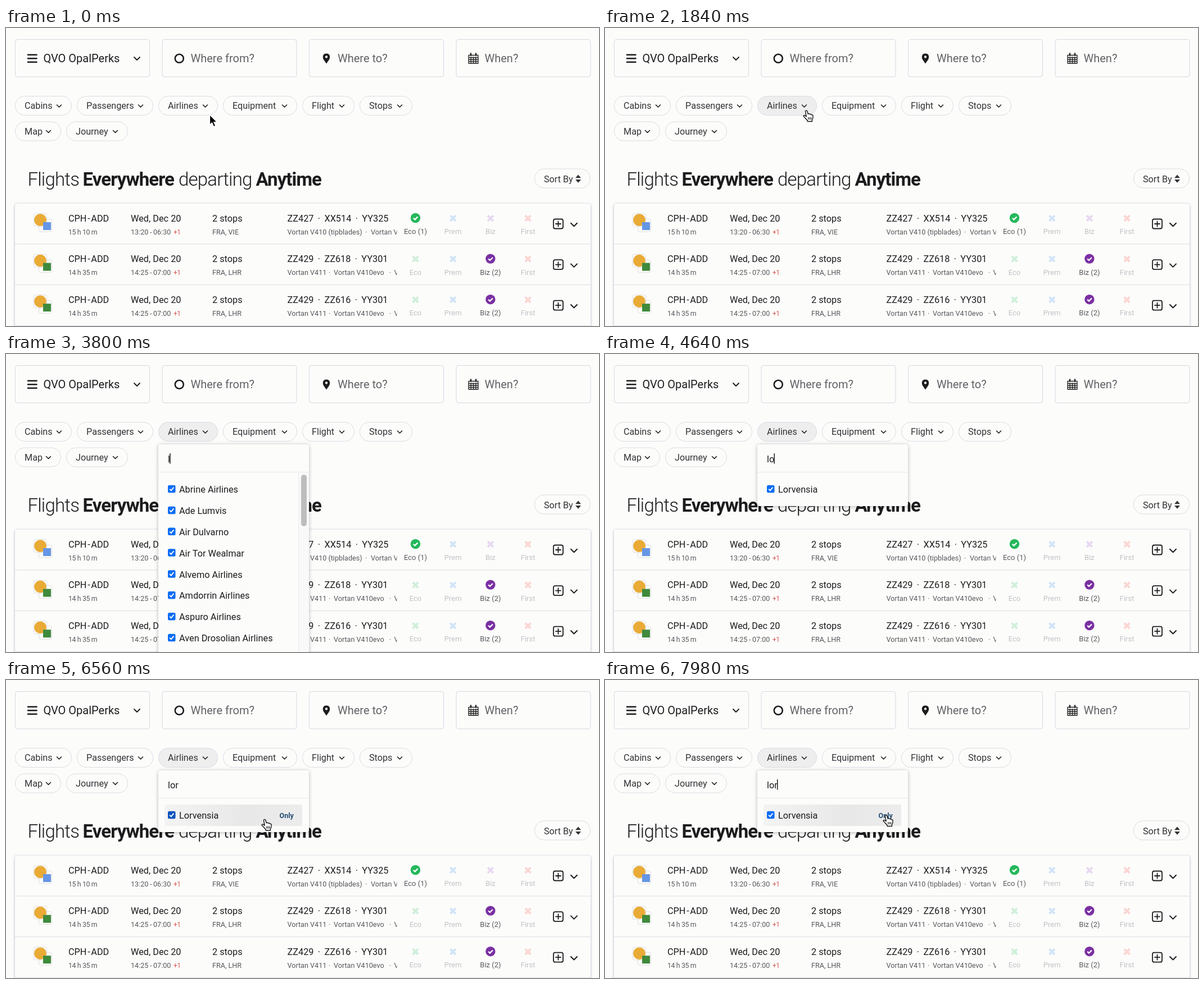
An HTML page for the animation above (8 s loop, 1055 px wide and 531 px high).

```html
<!DOCTYPE html>
<html lang="en">
<head>
<meta charset="utf-8">
<style>
  html, body { margin: 0; height: 100%; overflow: hidden; background: #fcfcfb; }
  svg { display: block; width: 1055px; height: 531px; overflow: hidden; }
  text { font-family: Roboto, "Open Sans", sans-serif; font-size: 16.3px; fill: #1c1c1e; white-space: pre; }
  .field { font-size: 20px; fill: #626266; }
  .program { font-size: 20px; }
  .pill { font-size: 16.2px; fill: #333336; }
  .title { font-size: 33px; font-weight: 300; letter-spacing: -.8px; }
  .bold { font-weight: 600; letter-spacing: -.9px; }
  .small { font-size: 12.6px; fill: #58585c; }
  .tight { font-size: 12.3px; letter-spacing: -.35px; }
  .plus { fill: #d9534f; font-size: 12px; letter-spacing: -.5px; }
  .cabin { font-size: 13px; text-anchor: middle; fill: #c2c2c6; }
  .on { fill: #5a5a5e; }
  .hint { fill: #757578; }
  .only { font-size: 12.5px; font-weight: 600; fill: #234c74; }
  .line { fill: none; stroke: #1c1c1e; stroke-width: 1.8; stroke-linecap: round; stroke-linejoin: round; }
  .card { filter: drop-shadow(0 1px 2px rgba(50, 45, 110, .38)); }
  .panel { filter: drop-shadow(0 1px 3px rgba(0, 0, 0, .28)); }
</style>
</head>
<body>
<svg viewBox="0 0 1055 531">
  <defs>
    <linearGradient id="hover"><stop stop-color="#f3f3f3"/><stop offset=".6" stop-color="#e8e8e8"/><stop offset="1" stop-color="#ececec"/></linearGradient>
    <clipPath id="planes"><path d="M490 300h205.5v240h-205.5z"/></clipPath>
  </defs>
  <g id="page"></g>
  <g id="menu"></g>
  <g id="cursor"></g>
</svg>
<script>
const LOOP = 8000;
const PAPER = '#fcfcfb';
const BORDER = 'stroke="#dcdce4"';
const $ = id => document.getElementById(id);

const text = (x, y, s, cls = '') => `<text x="${x}" y="${y}" class="${cls}">${s}</text>`;
const rect = (x, y, w, h, r, fill, extra = '') =>
  `<rect x="${x}" y="${y}" width="${w}" height="${h}" rx="${r}" fill="${fill}" ${extra}/>`;
const path = (d, attrs) => `<path d="${d}" ${attrs}/>`;
const line = (d, width = 1.8) => path(d, `class="line" style="stroke-width:${width}"`);
const circle = (x, y, r, fill) => `<circle cx="${x}" cy="${y}" r="${r}" fill="${fill}"/>`;
const chevron = (x, y, w = 4, width = 1.6) => line(`M${x - w} ${y - w / 2}l${w} ${w}l${w} ${-w}`, width);

function pill(x, y, w, label, id = '') {
  return rect(x + .5, y + .5, w - 1, 34, 17, PAPER, `${BORDER} id="${id}"`) +
    text(x + 17, y + 23.3, label, 'pill') + chevron(x + w - 22.5, y + 18);
}

function searchFields() {
  const labels = ['', 'Where from?', 'Where to?', 'When?'];
  const boxes = labels.map((label, i) => {
    const x = 16.5 + i * 261.5;
    return rect(x, 20.5, 239, 66.5, 4, PAPER, 'stroke="#d7d7e2"') + text(x + 50.5, 61.3, label, 'field');
  }).join('');
  const pin = 'M570 45.500c-7.500 0-7.500 8-3.800 12.500L570 63.500L573.800 58c3.700-4.500 3.700-12.500-3.800-12.500zm0 3.800a2.200 2.200 0 1 1-.01 0z';
  const calendar = 'M823 48.500h17v14.500h-17zM823 52.500h17M823 56h17M823 59.500h17M827.200 52v11M831.500 52v11M835.800 52v11';
  return boxes +
    line('M39 47.800h15.500M39 54.300h15.500M39 60.800h15.500', 2.6) +
    text(66.5, 61.3, 'QVO OpalPerks', 'program') + chevron(233, 54.5, 5, 1.8) +
    '<circle cx="308.300" cy="54.300" r="7.500" class="line" style="stroke-width:2.600"/>' +
    path(pin, 'fill="#1c1c1e"') + line(calendar, 1.3) + line('M827 45.500v3M836 45.500v3', 2.4);
}

const crossColors = ['#d0efda', '#d2e4f7', '#e8d8f1', '#fbd6d3'];

function cabin(i, y, name, seats) {
  const x = 728.5 + i * 66.7;
  const icon = seats
    ? circle(x, y, 8.7, i ? '#7a30a2' : '#25b85c') +
      path(`M${x - 3.7} ${y + .2}l2.700 2.700l5-5`, 'fill="none" stroke="#fff" stroke-width="2.200"')
    : path(`M${x - 4.8} ${y - 4.3}l9.600 9.600m0-9.600l-9.600 9.600`, `fill="none" stroke="${crossColors[i]}" stroke-width="4"`);
  return icon + text(x, y + 28.5, seats ? `${name} (${seats})` : name, seats ? 'cabin on' : 'cabin');
}

function flight(i, f) {
  const y = 338.5 + i * 72.6;
  const tile = (x, top) => rect(x, top, 23, 23, 3, PAPER, 'stroke="#dedede"');
  const cabins = ['Eco', 'Prem', 'Biz', 'First'].map((name, c) => cabin(c, y, name, c == f.cabin ? f.seats : 0));
  return tile(58.5, y + 1.5) + tile(49.5, y - 8) + circle(61, y + 3.5, 10.8, '#e9ab35') +
    rect(66, y + 7.5, 14, 14, 0, f.mark) +
    text(111, y + 6.3, 'CPH\u200a-\u200aADD') + text(111, y + 29, f.length, 'small tight') +
    text(222, y + 6.3, 'Wed, Dec 20') + text(222, y + 29, f.times, 'small') + text(298, y + 29, '+1', 'plus') +
    text(367, y + 6.3, '2 stops') + text(367, y + 29, f.via, 'small') +
    text(500.5, y + 6.3, f.codes.join('\u2009 · \u2009')) +
    `<g clip-path="url(#planes)">${f.planes.map(([x, s]) => text(x, y + 29, s, 'small')).join('')}</g>` +
    cabins.join('') +
    rect(974, y + 2, 17, 17, 3, 'none', 'stroke="#1c1c1e" stroke-width="1.800"') +
    line(`M978 ${y + 10.5}h9m-4.500-4.500v9`) + chevron(1010.5, y + 12, 5.5, 2) +
    path(`M16 ${y + 46.5}H1040`, 'stroke="#dddde6"');
}

function results() {
  const longer = {
    length: '14 h 35 m', times: '14:25\u2009-\u200907:00', via: 'FRA, LHR', mark: '#3f8a3c', cabin: 2, seats: 2,
    planes: [[500.5, 'Vortan V411'], [574, '·'], [583, 'Vortan V410evo'], [682, '·'], [690.5, 'Vortan']]
  };
  const flights = [
    { length: '15 h 10 m', times: '13:20\u2009-\u200906:30', via: 'FRA, VIE', mark: '#6696e6', cabin: 0, seats: 1,
      codes: ['ZZ427', 'XX514', 'YY325'],
      planes: [[500.5, 'Vortan V410 (tipblades)'], [639, '·'], [649, 'Vortan V410']] },
    { ...longer, codes: ['ZZ429', 'ZZ618', 'YY301'] },
    { ...longer, codes: ['ZZ429', 'ZZ616', 'YY301'] }
  ];
  return rect(16, 313, 1024, 260, 4, PAPER, 'class="card"') + flights.map((f, i) => flight(i, f)).join('');
}

$('page').innerHTML = searchFields() +
  pill(16, 121, 101, 'Cabins') + pill(126, 121, 136, 'Passengers') + pill(271, 121, 106, 'Airlines', 'airlines') +
  pill(386, 121, 132, 'Equipment') + pill(527, 121, 93, 'Flight') + pill(629, 121, 94, 'Stops') +
  pill(16, 166.5, 82, 'Map') + pill(107, 166.5, 110, 'Journey') +
  text(38.5, 281, 'Flights', 'title') + text(136.5, 281, 'Everywhere', 'title bold') +
  text(307, 281, 'departing', 'title') + text(444.5, 281, 'Anytime', 'title bold') +
  rect(940.5, 251, 99, 34, 17, PAPER, BORDER) + text(957, 274.5, 'Sort By', 'pill') +
  path('M1013 267.200l5-5.700l5 5.700zM1013 270l5 5.700l5-5.700z', 'fill="#333336"') +
  results();

const airlines = ['Abrine Airlines', 'Ade Lumvis', 'Air Cembro', 'Air Cusvo', 'Air Dulvarno', 'Air Ipeno',
  'Air Monvessio', 'Air Tor Wealmar', 'Alvemo Airlines', 'Amdorrin Airlines', 'Aspuro Airlines',
  'Aven Drosolian Airlines', 'Lorvensia'];

function menu({ query, caret, onItem, onLabel }) {
  const found = query ? airlines.filter(a => a.toLowerCase().includes(query)) : ['All', ...airlines];
  const long = found.length > 1;
  const items = found.slice(0, 9).map((name, i) => {
    const y = 240.3 + i * 37.85;
    return rect(288, y - 6.5, 13.5, 13.5, 2.5, onLabel ? '#0752bd' : '#0b6cf4') +
      path(`M291.200 ${y + .3}l2.600 2.700l4.600-5.700`, 'fill="none" stroke="#fff" stroke-width="1.900"') +
      text(308, y + 6.8, name);
  }).join('');
  const scroll = rect(520, 211, 19, 330, 0, '#f9f9f9') + path('M520.500 211V531', 'stroke="#ebebeb"') +
    rect(525, 215, 10, query ? 92 : 43, 5, '#bdbdbd');
  return rect(271, 161, 268, long ? 400 : 110, 4, PAPER, 'class="panel"') +
    path('M271 210.500H539', 'stroke="#e0e0e0" stroke-dasharray="2 1"') +
    (long ? scroll : '') +
    (onItem ? rect(282, 222, 245, 38, 2, 'url(#hover)') + text(486.5, 246, 'Only', 'only') : '') +
    items +
    `<text id="query" x="288" y="192.500" class="${query ? '' : 'hint'}">${query || 'Search'}</text>` +
    (caret ? '<path id="caret" stroke="#111" stroke-width="1.400"/>' : '');
}

const pointers = {
  arrow: path('M-.5-.5V17.500L3.500 13.800L6.500 20.800L9.800 19.400L6.800 12.600H12.300Z', 'fill="#000" stroke="#fff" stroke-width="1.300"'),
  hand: path('M-1.600 1.200C-1-.6 1.400-.6 1.900 1.200L3.200 6.200C4.200 5.200 6 5.600 6.400 6.800C7.400 6 9 6.500 9.400 7.800C10.600 7.200 12 8 12.100 9.600C12.200 13 11.600 15 10.400 17V19.500H2.200V18C0 15.500-2 13-4.400 10.800C-5.600 9.400-4 7.800-2.400 8.800L.2 10.600Z',
    'fill="#fff" stroke="#111" stroke-width="1.400" stroke-linejoin="round"') +
    path('M3.800 12v4.200M6.200 12v4.200M8.600 12v4.200', 'stroke="#111" stroke-width="1.100"'),
  beam: path('M-3.500-8.500Q0-8.500 0-6V6Q0 8.500-3.500 8.500M3.500-8.500Q0-8.500 0-6V6Q0 8.500 3.500 8.500M-2 2.500h4', 'fill="none" stroke="#111" stroke-width="1.500"')
};

// Pointer stops: [time, x, y]
const stops = [[0, 363, 155], [500, 363, 155], [850, 358, 147], [2500, 358, 147], [2780, 358, 170],
  [5850, 358, 170], [6450, 460, 248.5], [6950, 460, 248.5], [7500, 500, 241], [LOOP, 500, 241]];

function pointerAt(t) {
  const i = stops.findIndex(s => s[0] > t);
  const [a, b] = [stops[i - 1], stops[i]];
  const u = (t - a[0]) / (b[0] - a[0]), k = u * u * (3 - 2 * u);
  return [a[1] + (b[1] - a[1]) * k, a[2] + (b[2] - a[2]) * k];
}

let shown;
function draw(now) {
  const t = now % LOOP;
  const [x, y] = pointerAt(t);
  const open = t >= 2150;
  const query = 'lor'.slice(0, [3500, 4200, 4700].filter(k => t >= k).length);
  const caret = query && (t < 4700 || (t - 4700) % 1000 < 500);
  const onPill = y < 155, onItem = t > 5850 && y > 222, onLabel = onItem && x < 480;
  const hidden = t >= 3500 && t < 5850;

  const state = { open, query, caret, onItem, onLabel };
  const key = JSON.stringify(state);
  if (key !== shown) {
    shown = key;
    $('menu').innerHTML = open ? menu(state) : '';
    if (open && caret) $('caret').setAttribute('d', `M${288 + $('query').getComputedTextLength()} 177v18.500`);
  }
  $('airlines').setAttribute('fill', onPill || open ? '#eeeeef' : PAPER);
  const kind = onPill || onItem ? 'hand' : open && y > 161 && y < 210 ? 'beam' : 'arrow';
  $('cursor').innerHTML = hidden ? '' : `<g transform="translate(${x} ${y})">${pointers[kind]}</g>`;
  requestAnimationFrame(draw);
}
requestAnimationFrame(draw);
</script>
</body>
</html>
```
